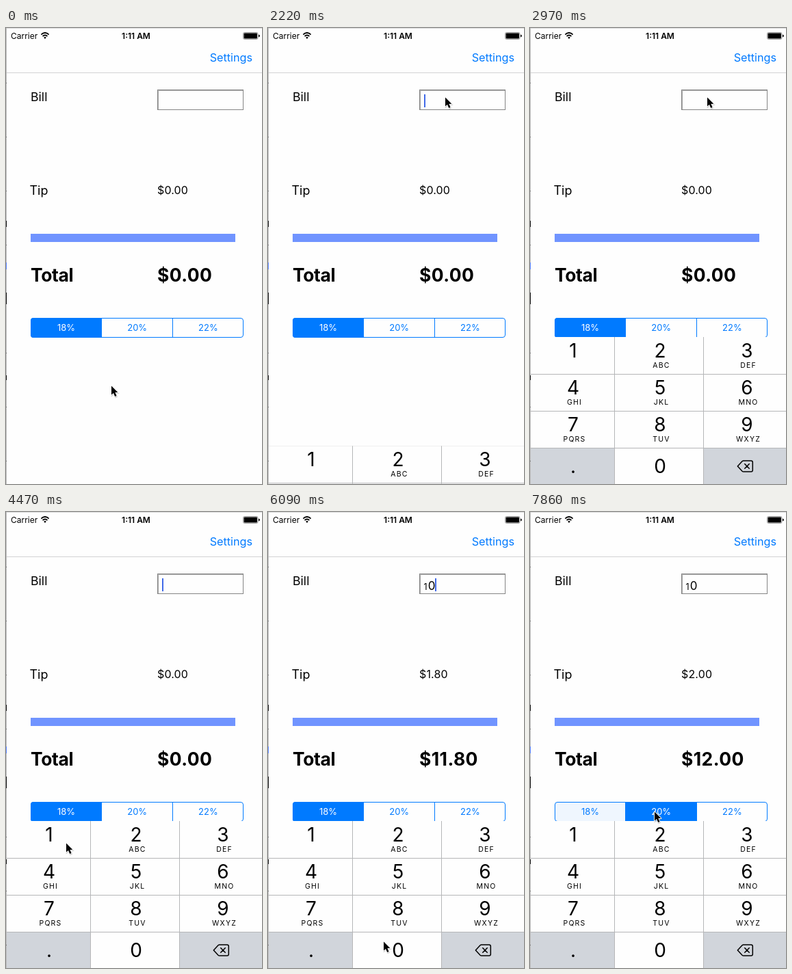
An HTML page that plays this animation: 374 by 667 pixels, repeating every 8 s.

```html
<!DOCTYPE html>
<html lang="en">
<head>
<meta charset="utf-8">
<title>Tip calculator</title>
<style>
html, body { margin: 0; width: 100%; height: 100%; overflow: hidden; background: #fefefe; }
svg { display: block; width: 374px; height: 667px; font-family: Inter, Roboto, sans-serif; }
.blue { fill: #007aff; }
.bold { font-weight: 700; font-size: 26.5px; }
.digit { font-size: 28px; text-anchor: middle; }
.letters { font-size: 10.5px; letter-spacing: 1.2px; text-anchor: middle; }
.seg { font-size: 13px; text-anchor: middle; }
</style>
</head>
<body>
<svg viewBox="0 0 374 667" xmlns="http://www.w3.org/2000/svg">
  <defs>
    <clipPath id="round"><rect x="36" y="424" width="311" height="29" rx="4"/></clipPath>
    <path id="arrow" d="M1 1.5V14.6L4 11.9L6.2 17L8.6 16L6.4 11H10.4Z"/>
  </defs>
  <rect width="374" height="667" fill="#fefefe"/>
  <g id="edge"></g>

  <text x="7" y="15.5" font-size="12">Carrier</text>
  <g fill="none" stroke="#000" stroke-width="1.8">
    <path d="M51.4 9.7Q57 4.3 62.6 9.7"/>
    <path d="M53.6 12.2Q57 8.8 60.4 12.2"/>
  </g>
  <path d="M55.1 13.8Q57 12 58.9 13.8L57 15.9Z"/>
  <text x="190" y="15.5" font-size="12" font-weight="600" text-anchor="middle">1:11 AM</text>
  <rect x="346.5" y="6.5" width="21.5" height="10" rx="2" fill="none" stroke="#777" stroke-width=".7"/>
  <rect x="347.5" y="7.5" width="19.5" height="8" rx="1"/>
  <path d="M369 9.6Q370.8 10 370.8 11.5T369 13.4Z"/>
  <text class="blue" x="360" y="49" font-size="16.2" text-anchor="end">Settings</text>
  <rect x="1" y="65" width="373" height="1" fill="#d2d2d4"/>

  <text x="36" y="107" font-size="17.7">Bill</text>
  <rect x="221.5" y="90.5" width="125" height="29" fill="#fefefe" stroke="#858585"/>
  <path d="M222.5 119V91.5H346" fill="none" stroke="#a8a8a8"/>
  <text id="one" x="227.6"></text>
  <text id="zero" x="233.8" y="114" font-size="17"></text>
  <rect id="caret" y="97" width="2" height="19" fill="#4169e8"/>

  <text x="34.5" y="244" font-size="18">Tip</text>
  <text id="tip" x="221" y="242.5" font-size="16" letter-spacing=".15"></text>
  <rect x="36" y="301" width="299" height="12" fill="#7094ff"/>
  <text class="bold" x="36" y="371" letter-spacing="-.4">Total</text>
  <text class="bold" id="total" x="221" y="371" letter-spacing=".4"></text>

  <g clip-path="url(#round)" id="fills"></g>
  <path d="M139.5 424V453M243.5 424V453" stroke="#007aff"/>
  <rect x="36.5" y="424.5" width="310" height="28" rx="3.5" fill="none" stroke="#007aff"/>
  <g id="labels"></g>

  <g id="pad"></g>
  <g id="mouse">
    <use href="#arrow" y="1.3" x=".5" fill="#777" stroke="#777" stroke-width="1.5" opacity=".35"/>
    <use href="#arrow" stroke="#fff" stroke-width="1.8" stroke-linejoin="round" paint-order="stroke"/>
  </g>
</svg>
<script>
const $ = id => document.getElementById(id);
const LOOP = 8000, STEP = 148, WHITE = '#fefefe', GREY = '#d1d5db';

// Moments of the story, counted in refresh steps
const FOCUS = 13, RISE = 14, TYPE_1 = 31, TYPE_0 = 39, PRESS = 52, PICK = 53;

function add(parent, tag, attrs, text) {
  const el = document.createElementNS('http://www.w3.org/2000/svg', tag);
  for (const k in attrs) el.setAttribute(k, attrs[k]);
  if (text) el.textContent = text;
  parent.appendChild(el);
  return el;
}
const box = (parent, x, y, width, height, fill) => add(parent, 'rect', { x, y, width, height, fill });

// Sliver of the desktop along the left side
const mark = (y, h, fill) => box($('edge'), 0, y, 1, h, fill);
box($('edge'), 0, 0, 374, 1, '#dcdcdc');
mark(0, 667, '#b9b9b9');
for (let y = 80; y < 667; y += 79) mark(y, 1, '#666');
mark(282, 9, '#000');
mark(343, 10, '#4f7dff');
mark(387, 17, '#000');
mark(508, 7, '#000');

const fills = [0, 1, 2].map(i => box($('fills'), 36 + i * 104, 424, 104, 29, '#007aff'));
const labels = ['18%', '20%', '22%'].map((s, i) =>
  add($('labels'), 'text', { class: 'seg', x: 88 + i * 103.7, y: 443 }, s));

// Keypad, drawn in its raised position
const pad = $('pad'), keys = {};
box(pad, 1, 452, 373, 215, '#b5b6b8');
['1', '2 ABC', '3 DEF', '4 GHI', '5 JKL', '6 MNO', '7 PQRS', '8 TUV', '9 WXYZ', '.', '0', ''].forEach((name, i) => {
  const col = i % 3, top = 452 + Math.floor(i / 3) * 54, last = i > 8;
  const x = col ? 130 * col - 6 : 1, mid = 62 + 127 * col;
  const [digit, sub] = name.split(' ');
  keys[digit] = box(pad, x, top + (i > 2), col ? 129 : 122, i > 2 ? 53 : 54, last && col != 1 ? GREY : WHITE);
  add(pad, 'text', { class: 'digit', x: mid + 1, y: top + (last ? 37 : 30) }, digit);
  if (sub) add(pad, 'text', { class: 'letters', x: mid + 3, y: top + 45 }, sub);
});
add(pad, 'path', { d: 'M303.3 641L310 633.8Q310.8 633 312 633H323Q325.3 633 325.3 635.3V646.7Q325.3 649 323 649H312Q310.8 649 310 648.2ZM313.3 637.2L320.7 644.8M320.7 637.2L313.3 644.8',
  fill: 'none', stroke: '#000', 'stroke-width': 1.5, 'stroke-linejoin': 'round' });

const clamp = v => Math.max(0, Math.min(1, v));
const ease = (n, from, to) => {
  const u = clamp((n - from) / (to - from));
  return u * u * (3 - 2 * u);
};

// Each move bends towards a control point on its way
const moves = [
  { from: 2, to: 11, start: [153, 522], bend: [60, 300], end: [258, 100] },
  { from: 24, to: 30, start: [258, 100], bend: [165, 320], end: [87, 483] },
  { from: 31, to: 36, start: [87, 483], bend: [125, 590], end: [168, 627] },
  { from: 43, to: 51, start: [168, 627], bend: [168, 520], end: [181, 437] }
];
function mouseAt(n) {
  const m = moves.filter(m => m.from <= n).pop() || moves[0];
  const u = ease(n, m.from, m.to), v = 1 - u;
  return [0, 1].map(i => v * v * m.start[i] + 2 * u * v * m.bend[i] + u * u * m.end[i]);
}

// Solid for a moment after each restart, then one blink per second
function caretOn(n) {
  const since = n < TYPE_1 ? RISE + .5 : n < TYPE_0 ? TYPE_1 : TYPE_0;
  const period = 1000 / STEP, age = n - since - 1.7;
  return n >= FOCUS && (age < 0 || age % period < period / 2);
}

function draw(time) {
  const n = Math.floor((time + 18) / STEP);
  const bill = n < TYPE_1 ? 0 : n < TYPE_0 ? 1 : 10;
  const picked = n < PICK ? 0 : 1;
  const tip = bill * (n < PRESS ? .18 : .2);
  $('tip').textContent = '$' + tip.toFixed(2);
  $('total').textContent = '$' + (bill + tip).toFixed(2);

  const two = bill > 1;
  $('one').textContent = bill ? '1' : '';
  $('one').setAttribute('font-size', two ? 12.5 : 14);
  $('one').setAttribute('y', two ? 113.5 : 112);
  $('zero').textContent = two ? '0' : '';
  $('caret').setAttribute('x', two ? 244 : bill ? 234 : 228);
  $('caret').setAttribute('opacity', +caretOn(n));

  fills.forEach((el, i) => {
    const tint = n >= PRESS && i == 1 - picked;
    el.setAttribute('opacity', i == picked ? 1 : tint ? .06 : 0);
    labels[i].setAttribute('fill', i == picked ? '#fff' : '#007aff');
  });

  keys['1'].setAttribute('fill', n >= TYPE_1 && n < TYPE_1 + 2 ? GREY : WHITE);
  keys['0'].setAttribute('fill', n == TYPE_0 ? GREY : WHITE);
  pad.setAttribute('transform', `translate(0 ${215 * (1 - ease(n, RISE, RISE + 3))})`);
  $('mouse').setAttribute('transform', `translate(${mouseAt(n).join(' ')})`);
}

function loop() {
  draw(performance.now() % LOOP);
  requestAnimationFrame(loop);
}
loop();
</script>
</body>
</html>
```
